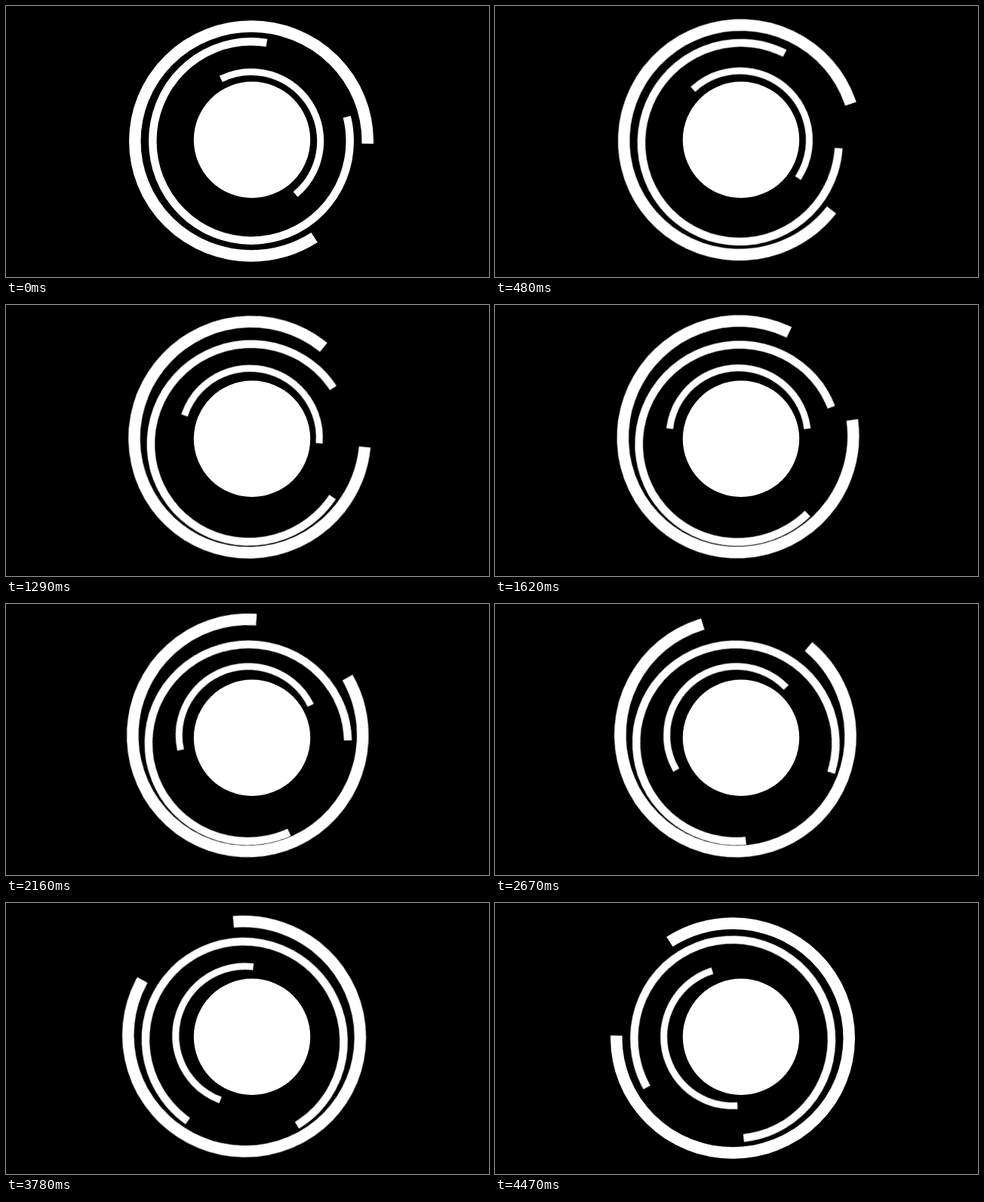
Write an HTML page that moves like this. It is 640 px wide and 360 px high and loops after 4500 ms.

```html
<!DOCTYPE html>
<html lang="en">
<head>
<meta charset="utf-8">
<title>Rotating rings</title>
<style>
  html, body {
    margin: 0;
    width: 100%;
    height: 100%;
    overflow: hidden;
    background: #000;
  }
  svg {
    display: block;
    width: 100vw;
    height: 100vh;
  }
  /* Each ring is drawn slightly off the pivot, so it wobbles as it turns. */
  .ring {
    fill: none;
    stroke: #fff;
    transform-origin: 320px 179.5px;
    animation: turn 4500ms steps(150, end) infinite;
  }
  .outer  { --turn: -181.2deg; stroke-width: 15.5; stroke-dasharray: 304.3 55.7;  stroke-dashoffset: -57; }
  .middle { --turn: 166deg;    stroke-width: 10.5; stroke-dasharray: 293.2 66.8;  stroke-dashoffset: -345.8; }
  .inner  { --turn: -158.8deg; stroke-width: 9;    stroke-dasharray: 166.3 193.7; stroke-dashoffset: -244; }
  @keyframes turn {
    from { transform: rotate(0deg); }
    to   { transform: rotate(var(--turn)); }
  }
</style>
</head>
<body>
<svg viewBox="0 0 640 360">
  <circle cx="326" cy="177.8" r="77.2" fill="#fff"/>
  <ellipse class="ring outer"  cx="325" cy="179.5" rx="154.2" ry="152.4" pathLength="360"/>
  <ellipse class="ring middle" cx="325" cy="179.5" rx="130.7" ry="132.2" pathLength="360"/>
  <ellipse class="ring inner"  cx="325" cy="179.5" rx="91.7"  ry="91.9"  pathLength="360"/>
</svg>
</body>
</html>
```
